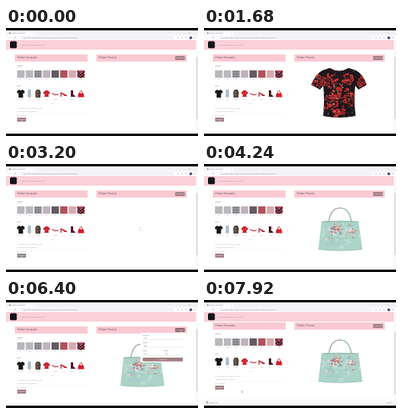
Animation, 240 px wide and 135 px high, one loop 8000 ms. Source, as an HTML page:

```html
<!DOCTYPE html>
<html lang="en">
<head>
<meta charset="utf-8">
<title>Pattern Generator</title>
<style>
html, body { margin: 0; width: 100%; height: 100%; overflow: hidden; background: #fff; }
svg { display: block; width: 100vw; height: 100vh; }
text { font-family: Roboto, Arial, sans-serif; }
</style>
</head>
<body>
<script>
const LOOP = 8000;
const NS = 'http://www.w3.org/2000/svg';

function add(parent, tag, attrs = {}, content) {
  const node = document.createElementNS(NS, tag);
  for (const key in attrs) node.setAttribute(key, attrs[key]);
  if (content) node.textContent = content;
  parent.append(node);
  return node;
}
const group = (parent, attrs) => add(parent, 'g', attrs);
const rect = (parent, x, y, width, height, fill, rx = 0) =>
  add(parent, 'rect', { x, y, width, height, fill, rx });
const ellipse = (parent, cx, cy, rx, ry, fill, opacity = 1) =>
  add(parent, 'ellipse', { cx, cy, rx, ry, fill, opacity });
const path = (parent, d, fill, extra) => add(parent, 'path', { d, fill, ...extra });
const line = (parent, d, stroke, width) =>
  path(parent, d, 'none', { stroke, 'stroke-width': width });
const label = (parent, x, y, size, fill, content, weight = 400) =>
  add(parent, 'text', { x, y, 'font-size': size, fill, 'font-weight': weight }, content);

function randomFrom(seed) {
  return () => (seed = (seed * 16807) % 2147483647) / 2147483647;
}
const rand = randomFrom(73);
const between = (low, high) => low + rand() * (high - low);
const pick = list => list[Math.floor(rand() * list.length)];

const svg = add(document.body, 'svg', { viewBox: '0 0 240 135', preserveAspectRatio: 'none' });
const defs = add(svg, 'defs');
rect(svg, 0, 0, 240, 135, '#fff');

function clipTo(id, d) {
  path(add(defs, 'clipPath', { id }), d, '#000');
  return `url(#${id})`;
}

// Scrolling page
const page = group(svg);
const PINK = '#fac9d3', INK = '#6d5962', PALE = '#a8a3a8', MAUVE = '#a27f84';
rect(page, 11, 33, 91, 9, PINK, .6);
rect(page, 113, 33, 113, 9, PINK, .6);
label(page, 14, 38.4, 3.2, INK, 'Pattern Generator');
label(page, 116, 38.4, 3.2, INK, 'Pattern Preview');
const download = rect(page, 211.5, 35, 12, 5, MAUVE, .6);
label(page, 213.2, 38.3, 2, '#fff', 'Download');
label(page, 14, 48, 2.2, INK, 'Pattern');
label(page, 14, 73, 2.2, INK, 'Item');
label(page, 55.5, 95, 2.2, '#77717a', '1 / 2');
label(page, 14, 100.5, 2.2, PALE, 'Or use your own image URL here');
label(page, 14.5, 105.4, 2.5, PALE, 'Choose file to upload');
line(page, 'M14 107.1H101', '#f0ecee', .4);
label(page, 17.5, 110.3, 2, PALE, 'Seamless');
add(page, 'rect', { x: 14.5, y: 108.7, width: 1.5, height: 1.5, fill: '#fff', stroke: '#bbb', 'stroke-width': .25 });
const generate = rect(page, 14, 112, 11, 5, MAUVE, .6);
label(page, 15.2, 115.3, 2, '#fff', 'Generate');
line(page, 'M104 81.5l1 1.5l-1 1.5', '#dc9ca8', .5);

const columnX = i => 18.5 + i * 10.75;
function caption(i, y, name) {
  label(page, columnX(i), y, 1.4, PALE, name).setAttribute('text-anchor', 'middle');
}

// Swatches: name, base, stroke, and a repeated stroke path
const swatches = [
  ['Dots', '#d9d7da', '#4a474f', 'M0 1h1M1 2h1'],
  ['Check', '#f2f1f2', '#34323a', 'M0 .5h1M1 1.5h1'],
  ['Tooth', '#dddcdf', '#2e2c33', 'M0 2L2 0M0 0L1 1'],
  ['Grid', '#e6e1e4', '#98868e', 'M0 1h2M1 0v2'],
  ['Plain', '#5c555d', '#8c7880', 'M0 1h1'],
  ['Plaid', '#a13540', '#c77780', 'M0 1h2M1 0v1'],
  ['Lines', '#efcdd3', '#a44c5a', 'M1 0v2'],
  ['Bands', '#98283a', '#dc9ba5', 'M0 2l2-2']
];
swatches.forEach(([name, base, stroke, d], i) => {
  const pattern = add(defs, 'pattern', { id: 'swatch' + i, width: 2, height: 2, patternUnits: 'userSpaceOnUse' });
  rect(pattern, 0, 0, 2, 2, base);
  line(pattern, d, stroke, .6);
  rect(page, columnX(i) - 4.6, 53, 9.2, 9.2, `url(#swatch${i})`);
  caption(i, 64.6, name);
});
line(page, 'M89.2 54l4.5 5l4.3 -5M89.2 58l4.5 4l4.3 -4', '#2d1b24', 1.2);

const TEE = 'M-2 -5Q0 -3 2 -5L5 -3L4 0L2.8 -.7V5H-2.8V-.7L-4 0L-5 -3Z';
const items = [
  ['T-shirt', TEE, '#17161b'],
  ['Case', 'M-1.8 -5H1.8L2.2 4L0 5L-2.2 4Z', '#a9bccb'],
  ['Jacket', 'M-2 -5H2L3.5 -2L3 5H-3L-3.5 -2Z', '#50443f'],
  ['Blouse', 'M-1.5 -4H1.5L4.5 -1L3 1L2 0L2.8 4H-2.8L-2 0L-3 1L-4.5 -1Z', '#cf2630'],
  ['Slipper', 'M-4 -1Q0 2 4 0L4 1.5Q0 3.5 -4 .5Z', '#b65a62'],
  ['Heels', 'M-4 -2L0 0L4 2V3H1L-2.5 0L-3 4H-4Z', '#b9242f'],
  ['Boots', 'M-2 -4H1V1L3.5 3V4H-2Z', '#4a1d24'],
  ['Bag', 'M-3.2 -.5H3.2L4 4.5H-4Z', '#cf2029']
];
items.forEach(([name, d, fill], i) => {
  path(page, d, fill, { transform: `translate(${columnX(i)} 82)` });
  caption(i, 90, name);
});
line(page, 'M39 78v8', '#af9b89', .6);
line(page, 'M91.7 82q2 -8 4 0', '#b61e28', .8);

// Printed T-shirt: red blooms over black, dusted with light specks
const SHIRT = 'M157 50Q169 57 181 50L190 53Q198 57 203.5 71L193 77L189 72Q187 90 189.5 110Q169 114 149 110Q151 90 149 72L145 77L134 71Q140 57 148 53Z';
const shirt = group(page, { 'clip-path': clipTo('shirt', SHIRT) });
rect(shirt, 133, 48, 72, 66, '#1d171c');
const blooms = [
  [143, 66, 8], [158, 66, 8], [155, 93, 11], [170, 82, 10],
  [167, 103, 8], [184, 88, 8], [180, 64, 6], [197, 66, 6]
];
for (const [x, y, size] of blooms) {
  for (let i = 0; i < 60; i++) {
    const a = between(0, Math.PI * 2), r = size * Math.sqrt(rand()) * 1.15;
    ellipse(shirt, x + Math.cos(a) * r, y + Math.sin(a) * r, between(.6, 2.2), between(.5, 1.7),
      pick(['#d5332e', '#c22b2d', '#e14a40', '#8d2427', '#241318']), .85);
  }
}
for (let i = 0; i < 330; i++) {
  const r = between(.2, .65);
  ellipse(shirt, between(134, 203), between(50, 112), r, r,
    pick(['#f0e8e8', '#9cc3cc', '#38707c', '#17131a', '#17131a', '#e0675e']));
}
line(shirt, 'M157 50Q169 59 181 50', '#3a171c', 1.2);
line(shirt, 'M149 72Q150 62 151 57M189 72Q188 62 187 57', '#1a151a', .6);

// Floral handbag in soft watercolour
const bag = group(page);
line(bag, 'M155.5 75C157 64 160 55 170 55C180 55 183 64 185 75', '#a5bfb7', 1.7);
line(bag, 'M158 65Q161 55 170 55', '#caa7a6', 1);
const BODY = 'M147 71.5Q169 70 193 71.5L198 107Q169 110 143 107Z';
const body = group(bag, { 'clip-path': clipTo('bag', BODY) });
rect(body, 142, 69, 58, 42, '#abd3c8');
function daub(count, x, y, spreadX, spreadY, size, inks, opacity) {
  for (let i = 0; i < count; i++)
    ellipse(body, x + between(-spreadX, spreadX) * rand(), y + between(-spreadY, spreadY) * rand(),
      between(.4, size), between(.3, size * .7), pick(inks), opacity);
}
daub(130, 170, 89, 34, 26, 4, ['#c8e5db', '#8fc2b8', '#dbe4d5', '#a2cbd0'], .45);
const PETALS = ['#e3b9bb', '#cf929a', '#f2e2dd', '#b7788a', '#735062', '#d9b98f'];
daub(80, 166, 81, 15, 9, 2.2, PETALS, .8);
daub(45, 185, 85, 10, 10, 1.9, PETALS, .75);
daub(20, 155, 94, 10, 8, 1.4, ['#e3c4c0', '#8aa99d', '#b9929a'], .6);
line(body, 'M147 72H193M143 107Q169 110 198 107', '#86aca3', .7);

const spinner = group(page);
for (let i = 0; i < 8; i++)
  add(spinner, 'circle', { cx: 0, cy: -2.1, r: .43, fill: '#777', opacity: (i + 1) / 9, transform: `rotate(${i * 45})` });

// Download options
const panel = group(page);
rect(panel, 168, 41, 56, 37, '#fff', .6);
[['File type', 'PNG', 44.5], ['Quality', 'High', 54]].forEach(([name, value, y]) => {
  label(panel, 171, y, 2, '#777178', name);
  line(panel, `M171 ${y + 5}H221`, '#ccc8cb', .3);
  label(panel, 172, y + 3.7, 2, INK, value);
});
[['Width', 171], ['Height', 197]].forEach(([name, x]) => {
  label(panel, x, 64, 2, '#777178', name);
  line(panel, `M${x} 69.5h24`, '#ccc8cb', .3);
  label(panel, x + 1, 68.2, 2, INK, '1024');
});
rect(panel, 171, 72, 50, 4.8, MAUVE, .5);
label(panel, 191.5, 75.1, 2.1, '#fff', 'Download');

// Fixed browser frame and navigation
rect(svg, 0, 0, 240, 10, '#f3f2f6');
rect(svg, 0, 0, 240, 3, '#050407');
rect(svg, 2, 4, 35, 6, '#fdfcfe', 1);
add(svg, 'circle', { cx: 4.8, cy: 6.5, r: .9, fill: '#777' });
label(svg, 7, 7.3, 2.2, '#77737b', 'Pattern Generator');
label(svg, 33.8, 7.4, 2.5, '#777', '×');
label(svg, 226, 7.3, 2.4, '#88858c', '–  □  ×');
rect(svg, 0, 9.5, 240, 5.5, '#fdfcfe');
rect(svg, 18, 10.2, 192, 4, '#f3f1f6', 2);
label(svg, 3, 13.2, 3, '#85818a', '←  →  ↻');
label(svg, 22, 13, 2.2, '#85818a', 'localhost:3000/pattern-generator/generate?pattern=floral&item=tshirt');
[215, 220, 225, 236].forEach(cx => add(svg, 'circle', { cx, cy: 12.2, r: .6, fill: '#98949e' }));
add(svg, 'circle', { cx: 231, cy: 12.2, r: 1.6, fill: '#34318c' });
rect(svg, 0, 15, 237.5, 12, '#fbd0d9');
rect(svg, 5, 16.4, 8.5, 8.8, '#15131a', 1.5);
label(svg, 17, 22, 2.3, '#b08f99', 'Home   Pattern Generator   About');
rect(svg, 237.5, 15, 2.5, 117, '#f8f7f9');
const thumb = rect(svg, 238, 36, 1.2, 78, '#d2ced4', .6);

const shelf = group(svg);
rect(shelf, 0, 125, 240, 7, '#fafafb');
line(shelf, 'M0 125H240', '#e6e4e8', .3);
rect(shelf, 3, 126.5, 2, 3, '#92b8b1');
label(shelf, 6, 128.9, 2.2, '#77737c', 'pattern.png');
label(shelf, 228, 128.9, 2, '#77737c', 'Show all');
rect(svg, 0, 132, 240, 3, '#050407');

const cursor = path(svg, 'M0 0V4L1 3L1.7 4.5L2.4 4.2L1.7 2.8H3Z', '#fff', { stroke: '#333', 'stroke-width': .3 });

// Time, x, y
const route = [
  [0, 19, 114], [3700, 19, 114], [4100, 92, 83], [4600, 51, 58],
  [4900, 19, 114], [5900, 19, 114], [6240, 218, 37], [6480, 218, 37],
  [6880, 197, 74], [7360, 197, 74], [7760, 47, 113], [8000, 47, 113]
];
const within = (time, spans) => spans.some(([start, end]) => time >= start && time < end);
const show = (node, visible) => node.setAttribute('display', visible ? 'inline' : 'none');

function positionAt(time) {
  const index = Math.max(1, route.findIndex(step => step[0] > time));
  const [startTime, startX, startY] = route[index - 1];
  const [endTime, endX, endY] = route[index];
  const p = (time - startTime) / (endTime - startTime);
  const ease = p * p * (3 - 2 * p);
  return [startX + (endX - startX) * ease, startY + (endY - startY) * ease];
}

function render(now) {
  const time = Math.floor((now % LOOP) / 80) * 80;
  const loading = within(time, [[240, 1040], [2880, 3920], [5040, 6000]]);
  const downloaded = time >= 7520;
  show(shirt, within(time, [[1040, 2880]]));
  show(bag, within(time, [[3920, 5040], [6000, LOOP]]));
  show(spinner, loading);
  show(panel, within(time, [[6320, 7440]]));
  show(shelf, downloaded);
  page.setAttribute('transform', `translate(0 ${downloaded ? -5 : 0})`);
  thumb.setAttribute('y', downloaded ? 40 : 36);
  spinner.setAttribute('transform', `translate(169 81) rotate(${Math.floor(time / 80) * 45})`);
  generate.setAttribute('fill', loading || within(time, [[1040, 1360]]) ? '#8e888c' : MAUVE);
  download.setAttribute('fill', within(time, [[6160, 6640]]) ? '#8c686f' : MAUVE);
  cursor.setAttribute('transform', `translate(${positionAt(time).join(' ')}) scale(.65)`);
}

const started = performance.now();
function tick() {
  render(performance.now() - started);
  requestAnimationFrame(tick);
}
tick();
</script>
</body>
</html>
```
